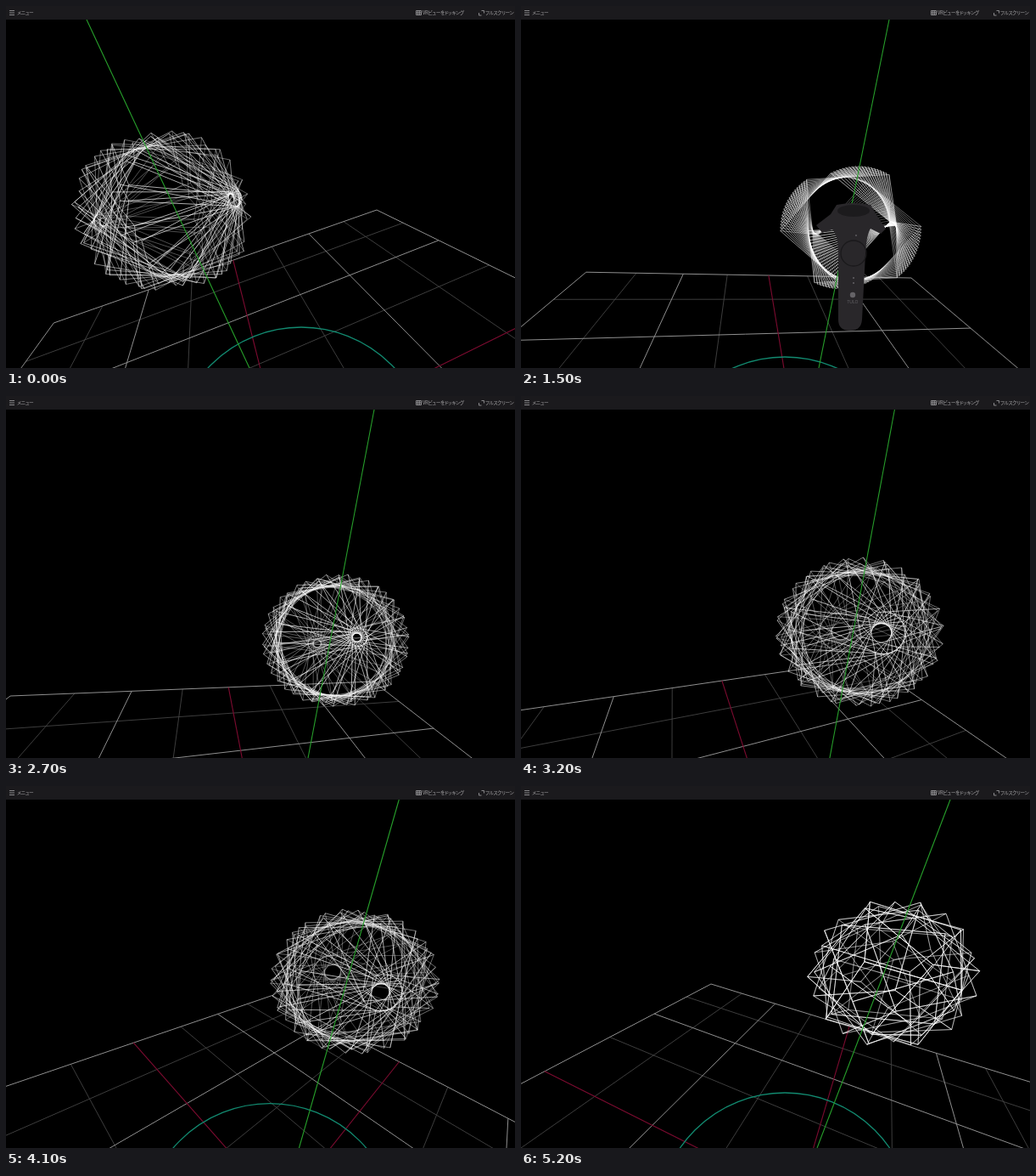
Recreate the animation shown at these times as an HTML page with a canvas. Size 600 by 426 pixels, loop 5.3 s.

```html
<!DOCTYPE html>
<html lang="ja">
<head>
<meta charset="utf-8">
<title>VR view</title>
<style>
  html, body { margin: 0; width: 100%; height: 100%; overflow: hidden; background: #000; }
  canvas { position: absolute; left: 0; top: 0; width: 600px; height: 426px; }
  .bar {
    position: absolute; left: 0; top: 0; width: 600px; height: 16px; background: #1b1a1d;
    color: #a5a4a6; font: 5.7px/16px "Noto Sans CJK JP", "Noto Sans CJK", sans-serif;
    font-feature-settings: "palt"; letter-spacing: -.3px; white-space: nowrap;
  }
  .bar span { position: absolute; top: 0; }
  .bar svg { position: absolute; left: 0; top: 0; fill: none; stroke: #a5a4a6; stroke-width: .8; }
</style>
</head>
<body>
<canvas id="view" width="600" height="426"></canvas>
<div class="bar">
  <svg width="600" height="16">
    <path d="M4 5.5h6M4 8h6M4 10.5h6M483.5 5.5h6v5h-6zM483.5 8h6M485.5 5.5v5M487.5 5.5v5"/>
    <path d="M560.5 5.5h3v3M557.5 8v3h3"/>
  </svg>
  <span style="left:13px">メニュー</span>
  <span style="left:491px">VRビューをドッキング</span>
  <span style="left:565px">フルスクリーン</span>
</div>
<script>
const ctx = document.getElementById('view').getContext('2d');
const LOOP = 5300, STEP = 100, COPIES = 20, RAD = Math.PI / 180;
const times = [0, 700, 1500, 2700, 3700, 4500, 5200];

// Floor is projective: (corner + s*a + t*b) / (1 + g*s + h*t)
const corner = [[437, 240], [592, 350.5], [460, 320], [433, 336], [363, 275], [264, 225], [224, 233]];
const sideA = [[-49, 7.3], [-46.3, 5.75], [-50, -9.4], [-53.7, -12.7], [-56.2, -13.2], [-52, -13.4], [-52.4, -14.8]];
const sideB = [[-29.3, -17.7], [-64.8, -32.5], [-35, -20.5], [-30, -23.3], [-7.9, -10.3], [18.1, 3.1], [27.6, 2.87]];
const depth = [[-.025, -.129], [.0243, -.178], [-.0273, -.132], [-.042, -.13], [-.0757, -.0945], [-.103, -.0454], [-.1206, -.034]];
// Vertical axis: x at the bar and at the bottom edge
const upright = [[95, 287], [378, 378], [434, 351], [434, 356], [451, 366], [478, 326], [506, 349]];
const ring = [[348, 528], [335, 592], [311, 563], [316, 592], [322, 558], [300, 494], [311, 511]];
const ball = [[186, 241], [382.5, 282], [390, 262], [388.5, 288], [411, 257], [413, 207], [440, 221]];
const size = [[113, 94], [93.5, 85], [84.5, 74.5], [86.5, 79], [109, 94], [89, 76.5], [102, 88]];
const pole = [[.71, -.16], [.61, -.01], [.5, .02], [.29, -.05], [.3, .1], [.35, .21], [.4, .3]];
// Turn between copies and tilt of each cube, in degrees
const turn = [[31, 6], [18, 6], [3, 7], [18, 7], [40.4, 22], [54, 6], [80, 24]];

// Cubic Hermite through the track's points
function at(track, t) {
  const last = times.length - 1;
  let i = 0;
  while (i < last - 1 && t >= times[i + 1]) i++;
  const span = times[i + 1] - times[i], u = (t - times[i]) / span;
  const slope = (k, c) => {
    const p = Math.max(k - 1, 0), n = Math.min(k + 1, last);
    return (track[n][c] - track[p][c]) / (times[n] - times[p]) * span;
  };
  return [0, 1].map(c =>
    track[i][c] * (1 + 2 * u) * (1 - u) ** 2 + slope(i, c) * u * (1 - u) ** 2 +
    track[i + 1][c] * u * u * (3 - 2 * u) + slope(i + 1, c) * u * u * (u - 1));
}

function line(p, q, color, width) {
  ctx.strokeStyle = color;
  ctx.lineWidth = width;
  ctx.beginPath();
  ctx.moveTo(p[0], p[1]);
  ctx.lineTo(q[0], q[1]);
  ctx.stroke();
}

function drawFloor(t) {
  const c = at(corner, t), a = at(sideA, t), b = at(sideB, t), [g, h] = at(depth, t);
  const weight = (s, r) => 1 + g * s + h * r;
  const point = (s, r) => [0, 1].map(k => (c[k] + s * a[k] + r * b[k]) / weight(s, r));
  // Stop before the camera plane
  const reach = (w0, w1) => w1 > .05 ? 8 : 8 * (w0 - .05) / (w0 - w1);
  const draw = (n, color, width) => {
    if (weight(n, 0) > .05) line(point(n, 0), point(n, reach(weight(n, 0), weight(n, 8))), color, width);
    if (weight(0, n) > .05) line(point(0, n), point(reach(weight(0, n), weight(8, n)), n), color, width);
  };
  for (const n of [1, 3, 5, 7]) draw(n, '#454545', .9);
  for (const n of [0, 2, 6, 8]) draw(n, '#8f8f8f', 1);
  draw(4, '#7d0b30', 1.1);
}

function drawRing(t) {
  const [x, y] = at(ring, t);
  ctx.strokeStyle = '#128a70';
  ctx.lineWidth = 1.3;
  ctx.beginPath();
  ctx.arc(x, y, 150, 0, 7);
  ctx.stroke();
}

// Cube standing on its diagonal: six vertices around, two at the poles
const cube = [[0, 0, 1], [0, 0, -1]];
const edges = [];
for (let j = 0; j < 6; j++) {
  const r = Math.sqrt(8) / 3, v = j * 60 * RAD;
  cube.push([r * Math.cos(v), r * Math.sin(v), j % 2 ? -1 / 3 : 1 / 3]);
  edges.push([j + 2, (j + 1) % 6 + 2], [j + 2, j % 2]);
}

function drawBall(t) {
  const [x, y] = at(ball, t), [rx, ry] = at(size, t), [nx, ny] = at(pole, t), [step, tilt] = at(turn, t);
  const nz = Math.sqrt(1 - nx * nx - ny * ny), m = Math.hypot(nx, nz);
  const e1 = [nz / m, 0, -nx / m];
  const e2 = [ny * e1[2], nz * e1[0] - nx * e1[2], -ny * e1[0]];
  const ct = Math.cos(tilt * RAD), st = Math.sin(tilt * RAD);
  for (let i = 0; i < COPIES; i++) {
    const cs = Math.cos(i * step * RAD), sn = Math.sin(i * step * RAD);
    const pts = cube.map(([px, py, pz]) => {
      const qy = py * ct - pz * st, w = py * st + pz * ct;
      const u = px * cs - qy * sn, v = px * sn + qy * cs;
      const z = u * e1[2] + v * e2[2] + w * nz, k = 1 + .08 * z;
      return [x + rx * k * (u * e1[0] + v * e2[0] + w * nx), y + ry * k * (v * e2[1] + w * ny), z];
    });
    for (const [p, q] of edges) {
      const near = (pts[p][2] + pts[q][2]) / 2;
      line(pts[p], pts[q], `rgba(255,255,255,${.58 + .2 * near})`, .8 + .15 * near);
    }
  }
}

function drawAxis(t) {
  const [top, bottom] = at(upright, t);
  line([top, 16], [bottom, 426], '#27a02b', 1.1);
}

const body = new Path2D('M372 234Q392 230 412 234L417 243L430 262L424 268L412 262Q407 270 406 292' +
  'L402 369Q401 382 388 382Q374 382 374 369V290Q374 270 367 263L355 267L348 258L365 245Z');

function drawController(t) {
  if (t < 1100 || t > 2100) return;
  const away = Math.max(0, 1400 - t, t - 1700) / 350;
  ctx.save();
  ctx.translate(-8 * away, 200 * away * away);
  ctx.fillStyle = '#29272a';
  ctx.fill(body);
  ctx.fillStyle = '#1c1b1d';
  ctx.beginPath();
  ctx.ellipse(392, 241, 19, 7, 0, 0, 7);
  ctx.fill();
  ctx.strokeStyle = '#1a191b';
  ctx.lineWidth = 1.3;
  ctx.beginPath();
  ctx.arc(392, 291, 15, 0, 7);
  ctx.stroke();
  ctx.fillStyle = '#656367';
  for (const [x, y, r] of [[395, 270, .9], [392, 320, 1], [392, 326, 1], [391, 340, 3.2]]) {
    ctx.beginPath();
    ctx.arc(x, y, r, 0, 7);
    ctx.fill();
  }
  ctx.font = '5px "Open Sans", sans-serif';
  ctx.textAlign = 'center';
  ctx.fillText('TULO', 391, 350);
  ctx.restore();
}

function frame(now) {
  const t = Math.floor(now % LOOP / STEP) * STEP;
  ctx.fillStyle = '#000';
  ctx.fillRect(0, 0, 600, 426);
  drawFloor(t);
  drawRing(t);
  drawBall(t);
  drawAxis(t);
  drawController(t);
  requestAnimationFrame(() => frame(performance.now() - start));
}
const start = performance.now();
frame(0);
</script>
</body>
</html>
```
